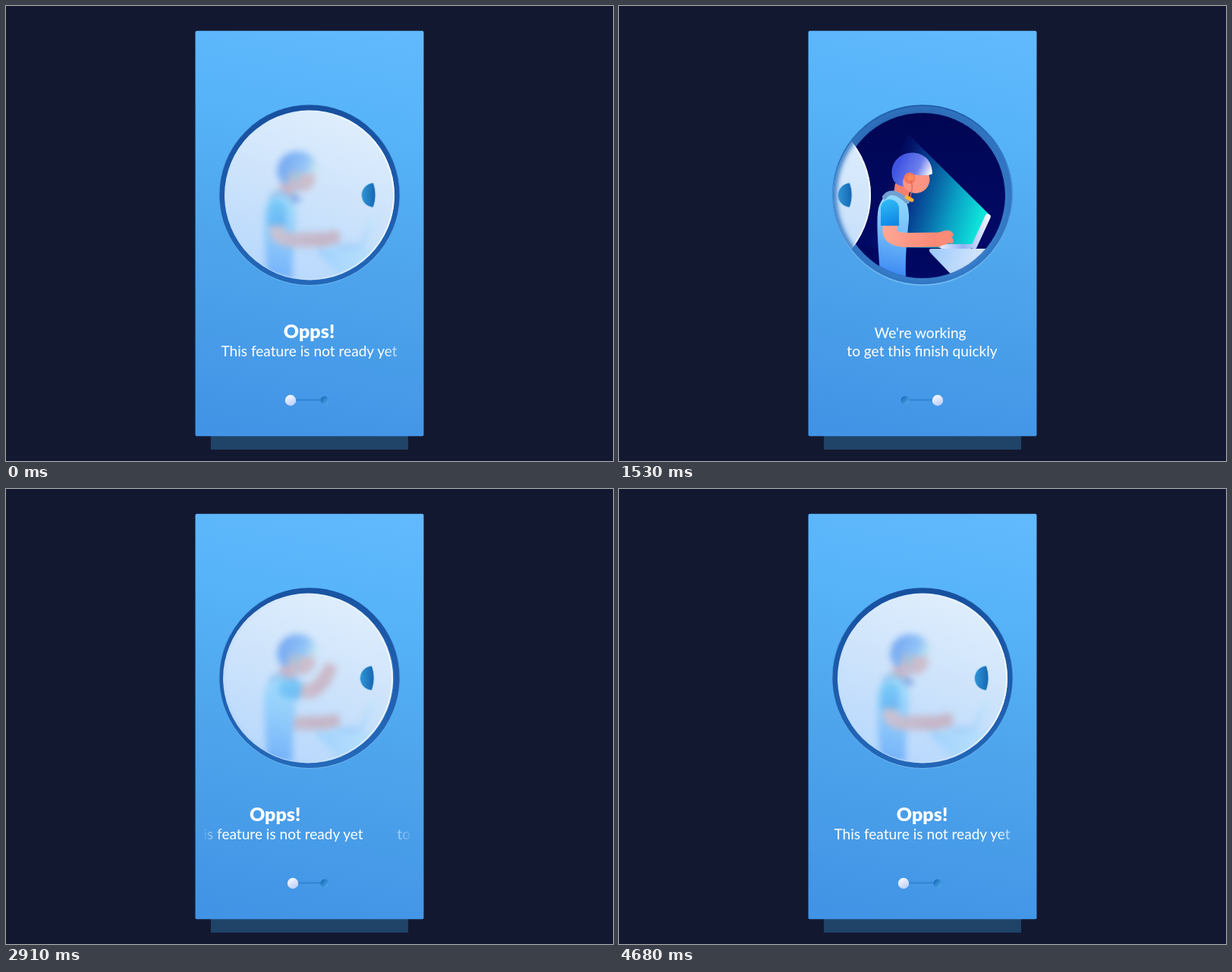
Recreate the animation shown at these times as an HTML page. Size 800x600 px, loop 4.71 s.

```html
<!DOCTYPE html>
<html lang="en">
<head>
<meta charset="utf-8">
<title>Not ready yet</title>
<style>
  html, body { margin: 0; width: 100%; height: 100%; overflow: hidden; background: #131831; }
  svg { display: block; width: 800px; height: 600px; }
  text { font: 400 19.1px Lato, sans-serif; fill: #fff; text-anchor: middle; }
  .title { font-size: 25px; font-weight: 900; }
</style>
</head>
<body>
<svg viewBox="0 0 800 600">
  <defs>
    <linearGradient id="card" gradientUnits="userSpaceOnUse" x1="455" y1="20" x2="345" y2="580">
      <stop offset="0" stop-color="#62b9fd"/><stop offset=".25" stop-color="#56b3f8"/>
      <stop offset=".55" stop-color="#4ea5ec"/><stop offset="1" stop-color="#4193e5"/>
    </linearGradient>
    <linearGradient id="rim" x1="0" y1="0" x2=".4" y2="1">
      <stop offset="0" stop-color="#2a64ae"/><stop offset="1" stop-color="#3a80cc"/>
    </linearGradient>
    <linearGradient id="lip" x1="0" y1="0" x2="0" y2="1">
      <stop offset="0" stop-color="#1c5ba6"/><stop offset=".5" stop-color="#4595dd"/>
      <stop offset="1" stop-color="#74c0f6"/>
    </linearGradient>
    <linearGradient id="gapFill" x1="0" y1="0" x2="0" y2="1">
      <stop offset="0" stop-color="#17509f"/><stop offset="1" stop-color="#2367b8"/>
    </linearGradient>
    <linearGradient id="night" x1="0" y1="0" x2="0" y2="1">
      <stop offset="0" stop-color="#020652"/><stop offset="1" stop-color="#000a6c"/>
    </linearGradient>
    <linearGradient id="beam" gradientUnits="userSpaceOnUse" x1="472" y1="296" x2="345" y2="258">
      <stop id="b0" offset="0"/><stop id="b1" offset=".3"/>
      <stop offset=".72" stop-color="#073a90" stop-opacity=".9"/>
      <stop offset="1" stop-color="#04126a" stop-opacity="0"/>
    </linearGradient>
    <linearGradient id="desk" gradientUnits="userSpaceOnUse" x1="410" y1="320" x2="480" y2="345">
      <stop offset="0" stop-color="#9cc9fb"/><stop offset="1" stop-color="#dbe9fd"/>
    </linearGradient>
    <linearGradient id="metal" gradientUnits="userSpaceOnUse" x1="420" y1="300" x2="488" y2="300">
      <stop offset="0" stop-color="#eaf2ff"/><stop offset=".5" stop-color="#8fb2f2"/>
      <stop offset="1" stop-color="#f2f6ff"/>
    </linearGradient>
    <linearGradient id="vest" gradientUnits="userSpaceOnUse" x1="372" y1="250" x2="350" y2="357">
      <stop offset="0" stop-color="#93dbfc"/><stop offset=".45" stop-color="#74bdfa"/>
      <stop offset="1" stop-color="#3a87f3"/>
    </linearGradient>
    <linearGradient id="cloth" gradientUnits="userSpaceOnUse" x1="350" y1="254" x2="362" y2="292">
      <stop offset="0" stop-color="#34bdf5"/><stop offset="1" stop-color="#0a82e6"/>
    </linearGradient>
    <linearGradient id="skin" gradientUnits="userSpaceOnUse" x1="350" y1="290" x2="430" y2="300">
      <stop offset="0" stop-color="#ffa795"/><stop offset="1" stop-color="#f7836f"/>
    </linearGradient>
    <linearGradient id="hair" gradientUnits="userSpaceOnUse" x1="370" y1="203" x2="410" y2="222">
      <stop id="h0" offset="0"/><stop id="h1" offset=".6"/><stop id="h2" offset="1"/>
    </linearGradient>
    <linearGradient id="disc" gradientUnits="userSpaceOnUse" x1="435" y1="138" x2="360" y2="361">
      <stop offset="0" stop-color="#dfeefd"/><stop offset=".5" stop-color="#cde3fb"/>
      <stop offset="1" stop-color="#b7d8fd"/>
    </linearGradient>
    <linearGradient id="shine">
      <stop offset=".4" stop-color="#fff" stop-opacity="0"/><stop offset="1" stop-color="#fff"/>
    </linearGradient>
    <linearGradient id="grip">
      <stop offset="0" stop-color="#3196d8"/><stop offset="1" stop-color="#1565b0"/>
    </linearGradient>
    <linearGradient id="dent" x1="0" y1="0" x2="1" y2="1">
      <stop offset=".2" stop-color="#1c70bd"/><stop offset="1" stop-color="#5cb4f4"/>
    </linearGradient>
    <linearGradient id="pearl" x1="0" y1="0" x2=".5" y2="1">
      <stop offset="0" stop-color="#fff"/><stop offset="1" stop-color="#bfd0fa"/>
    </linearGradient>
    <linearGradient id="fade" gradientUnits="userSpaceOnUse" x1="258" y1="0" x2="537" y2="0">
      <stop offset="0" stop-color="#000"/><stop offset=".1" stop-color="#fff"/>
      <stop offset=".86" stop-color="#fff"/><stop offset="1" stop-color="#000"/>
    </linearGradient>
    <mask id="edges" maskUnits="userSpaceOnUse" x="250" y="400" width="300" height="80">
      <rect x="258" y="400" width="279" height="80" fill="url(#fade)"/>
    </mask>
    <clipPath id="hole"><circle cx="400" cy="249.5" r="117"/></clipPath>
    <clipPath id="opening"><circle cx="400" cy="250" r="109"/></clipPath>
    <clipPath id="pane"><circle id="paneClip" cx="400" cy="249.5" r="111"/></clipPath>
    <filter id="frost" filterUnits="userSpaceOnUse" x="250" y="120" width="300" height="260" color-interpolation-filters="sRGB">
      <feGaussianBlur stdDeviation="4.5"/>
      <feColorMatrix values=".8 0 0 0 0  0 .92 0 0 .05  0 0 .8 0 .2  0 0 0 1 0"/>
    </filter>
    <filter id="soft" filterUnits="userSpaceOnUse" x="250" y="110" width="300" height="280"><feGaussianBlur stdDeviation="3"/></filter>
    <path id="hand" d="M-6 -8 C0 -9 3 -12 9 -11.5 C14 -11.5 17 -8 17 -5 L13.5 -3.5 C17 -1 17.500 3 15 5 L10 4.500 C6 7 0 8 -6 8 Z"/>
  </defs>

  <rect x="270" y="567" width="260" height="18" fill="#1f4467"/>
  <rect x="249.5" y="32.7" width="301" height="534.5" rx="2" fill="url(#card)"/>

  <circle cx="400" cy="249.5" r="118.5" fill="url(#rim)" stroke="url(#lip)" stroke-width="1.5"/>
  <g clip-path="url(#opening)">
    <rect x="285" y="135" width="230" height="230" fill="url(#night)"/>
    <rect x="285" y="316" width="230" height="50" fill="#000450" opacity=".35"/>
    <path d="M380 168 L489 276 L468 319 L318 319 Z" fill="url(#beam)"/>
    <g id="scene">
      <path d="M412 320 H530 V370 H453 L410 325 Q407 320 412 320 Z" fill="url(#desk)"/>
      <path d="M468 317 L486 278" stroke="url(#metal)" stroke-width="7.500" stroke-linecap="round"/>
      <path d="M420 314 H467 L464 320 H426 Q420 319 420 314 Z" fill="url(#metal)"/>
      <path d="M366 309 L424 308" stroke="url(#skin)" stroke-width="18"/>
      <use href="#hand" id="farHand" fill="#f98b77"/>
      <path d="M344 360 C343 330 339 296 341 272 C343 254 354 246 364 246 C376 248 383 262 382 282 C380 302 377 330 378 360 Z" fill="url(#vest)"/>
      <g id="head">
        <path d="M364 234 H386 L381 252 L362 247 Z" fill="#f5806f"/>
        <circle cx="391" cy="228.500" r="18.500" fill="#fb9482"/>
        <path d="M413 221.500 C413 204 402 193.500 386 193.500 C371 193.500 359.500 205 359.500 220 C359.500 231 366 237 375 238 C372 226 378 221 390 222.500 C399 224 408 223.500 413 221.500 Z" fill="url(#hair)"/>
        <circle cx="383" cy="227" r="7.500" fill="#f5775f"/>
        <circle id="bud" cx="384" cy="226.500" r="4"/>
        <path id="wire" d="M384 230 C389 238 385 244 384 252" fill="none" stroke-width="1.300"/>
      </g>
      <path d="M350 252 C356 243 367 245 380 258" fill="none" stroke="#729fd2" stroke-width="6" stroke-linecap="round"/>
      <path id="mic" d="M379 252 L386 256" stroke-width="5" stroke-linecap="round"/>
      <path id="arm" fill="none" stroke="url(#skin)" stroke-width="19" stroke-linejoin="round"/>
      <use href="#hand" id="nearHand" fill="#f98b77"/>
      <path id="sleeve" stroke="url(#cloth)" stroke-width="24"/>
      <circle id="cap" r="12" fill="url(#cloth)"/>
    </g>
  </g>

  <circle id="gap" cx="400" cy="249.5" r="115" fill="none" stroke="url(#gapFill)" stroke-width="7"/>
  <g clip-path="url(#hole)">
    <circle class="slide" cx="400" cy="249.5" r="112" fill="url(#disc)"/>
    <g clip-path="url(#pane)">
      <use href="#scene" filter="url(#frost)" opacity=".48"/>
    </g>
    <g class="slide">
      <circle cx="400" cy="249.5" r="111" fill="none" stroke="url(#shine)" stroke-width="2" opacity=".75"/>
      <path d="M484 233 C475 234 468.500 241 468.500 249.500 S475 265 484 265.500 C488 255 488 243 484 233 Z" fill="url(#grip)" stroke="#a9d3f3" stroke-width="1"/>
    </g>
    <circle id="inner" cx="400" cy="249.5" r="118" fill="none" stroke="#2f74c2" stroke-width="9" filter="url(#soft)"/>
  </g>

  <g mask="url(#edges)">
    <g id="first">
      <text class="title" x="399.5" y="437.5">Opps!</text>
      <text x="399.5" y="462">This feature is not ready yet</text>
    </g>
    <g id="second">
      <text x="397" y="438">We're working</text>
      <text x="399.5" y="462">to get this finish quickly</text>
    </g>
  </g>

  <path d="M382 519.500 H416" stroke="#2f86cf" stroke-width="2"/>
  <circle cx="377" cy="520" r="5.500" fill="url(#dent)"/>
  <circle cx="420" cy="520" r="5.500" fill="url(#dent)"/>
  <circle id="knob" cy="520" r="7.200" fill="url(#pearl)"/>

  <rect id="touch" y="386" height="32" rx="16" fill="#fff" fill-opacity=".05" stroke="#fff" stroke-width="8"/>
</svg>
<script>
const LOOP = 4710;
const $ = id => document.getElementById(id);
const set = (el, attrs) => { for (const k in attrs) el.setAttribute(k, attrs[k]); };
const clamp = x => Math.max(0, Math.min(1, x));
const lerp = (a, b, k) => a + (b - a) * k;
const mixPoint = (p, q, k) => [lerp(p[0], q[0], k), lerp(p[1], q[1], k)];

// Cubic bezier (.7, 0, .2, 1), solved by bisection
function ease(x) {
  let lo = 0, hi = 1, s = .5;
  for (let i = 0; i < 22; i++) {
    s = (lo + hi) / 2;
    const r = 1 - s;
    if (3 * r * r * s * .7 + 3 * r * s * s * .2 + s ** 3 < x) lo = s; else hi = s;
  }
  return 3 * (1 - s) * s * s + s ** 3;
}
const move = (t, start, length) => ease(clamp((t - start) / length));
const trip = (t, a, aLen, b, bLen) => move(t, a, aLen) - move(t, b, bLen);

function track(keys, t) {
  let i = 0;
  while (i < keys.length - 2 && t >= keys[i + 1][0]) i++;
  const [a, b] = [keys[i], keys[i + 1]];
  const x = clamp((t - a[0]) / (b[0] - a[0])), k = x * x * (3 - 2 * x);
  return a.slice(1).map((v, j) => lerp(v, b[j + 1], k));
}

// time, elbow x y, wrist x y
const ARM = [
  [0, 357, 309, 424, 308], [1560, 357, 309, 424, 308], [1720, 347, 300, 368, 314],
  [1900, 338, 288, 300, 282], [2200, 339, 286, 300, 280], [2460, 346, 282, 312, 281],
  [2660, 362, 290, 380, 296], [2850, 404, 268, 423, 247], [3200, 405, 268, 424, 246],
  [3450, 364, 304, 420, 306], [3640, 352, 306, 372, 328], [3850, 341, 290, 322, 292],
  [4020, 341, 290, 322, 292], [4320, 357, 309, 424, 308], [LOOP, 357, 309, 424, 308]
];
// time, head x y
const HEAD = [[0, -2, -2], [630, 0, 0], [2460, 0, 0], [2850, -2, -2], [3200, -2, -2], [3450, 0, 0], [4500, -2, -2], [LOOP, -2, -2]];
// time, screen hue
const GLOW = [[0, 0], [900, 0], [1450, 1], [1650, 1], [2300, 0], [LOOP, 0]];

const TINTS = [
  ['b0', 'stop-color', [22, 176, 240], [14, 228, 218]],
  ['b1', 'stop-color', [14, 122, 214], [10, 158, 196]],
  ['h0', 'stop-color', [32, 104, 226], [64, 84, 226]],
  ['h1', 'stop-color', [92, 158, 240], [108, 126, 236]],
  ['h2', 'stop-color', [252, 246, 222], [246, 246, 255]],
  ['bud', 'fill', [44, 208, 232], [248, 140, 92]],
  ['wire', 'stroke', [58, 150, 226], [222, 104, 84]],
  ['mic', 'stroke', [18, 62, 178], [248, 178, 62]]
];

const slides = document.querySelectorAll('.slide');

function drawArm(t) {
  const [ex, ey, hx, hy] = track(ARM, t);
  const elbow = [ex, ey], wrist = [hx, hy];
  const shoulder = [357 + (ex - 357) * .3, 267 + (ey - 309) * .1];
  const tap = Math.sin(t / 1000 * Math.PI * 8);
  set($('arm'), { d: `M${shoulder} L${mixPoint(shoulder, elbow, .7)} Q${elbow} ${mixPoint(elbow, wrist, .4)} L${wrist}` });
  set($('sleeve'), { d: `M${shoulder} L${mixPoint(shoulder, elbow, .54)}` });
  set($('cap'), { cx: shoulder[0], cy: shoulder[1] });
  const turn = Math.atan2(hy - ey, hx - ex) * 180 / Math.PI;
  set($('nearHand'), { transform: `translate(${hx} ${hy + tap * .6}) rotate(${turn})` });
  set($('farHand'), { transform: `translate(424 ${308 - tap * .6})` });
}

function drawTouch(t) {
  const back = t > 2000, u = back ? t - 2100 : t;
  const place = p => back ? lerp(280, 514, p) : lerp(524, 290, p);
  const a = place(move(u, 411, 520)), b = place(move(u, 500, 514));
  set($('touch'), {
    x: Math.min(a, b) - 16,
    width: Math.abs(a - b) + 32,
    opacity: clamp((u - 370) / 60) * clamp((810 - u) / 80)
  });
}

function render(t) {
  const door = trip(t, 446, 605, 2564, 400);
  const page = trip(t, 450, 630, 2470, 745);
  const knob = trip(t, 388, 600, 2487, 600);
  const shift = -180 * door;

  slides.forEach(el => set(el, { transform: `translate(${shift} 0)` }));
  set($('paneClip'), { cx: 400 + shift });
  set($('gap'), { opacity: clamp(1 - door * 8) });
  set($('inner'), { opacity: clamp(door * 8) });

  set($('first'), { transform: `translate(${-260 * page} 0)` });
  set($('second'), { transform: `translate(${260 * (1 - page)} 0)` });
  set($('knob'), { cx: lerp(375, 420, knob) });

  const [hue] = track(GLOW, t);
  for (const [id, attr, cool, warm] of TINTS) {
    const rgb = cool.map((c, i) => Math.round(lerp(c, warm[i], hue)));
    set($(id), { [attr]: `rgb(${rgb})` });
  }
  set($('head'), { transform: `translate(${track(HEAD, t).join(' ')})` });
  drawArm(t);
  drawTouch(t);
}

const start = performance.now();
function tick() {
  render((performance.now() - start) % LOOP);
  requestAnimationFrame(tick);
}
tick();
</script>
</body>
</html>
```
